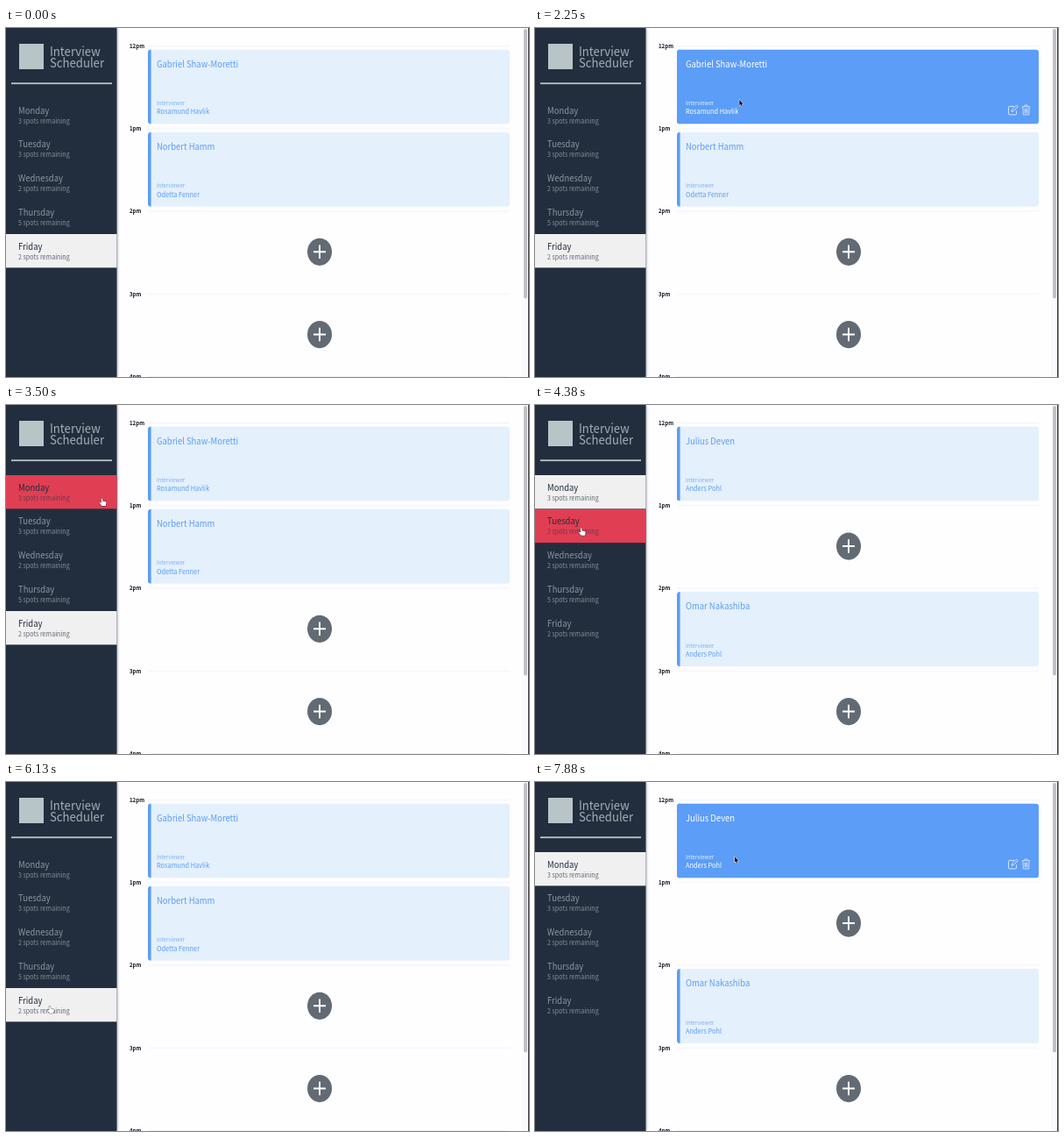
These frames come from a looping animation (597 px wide and 398 px high, 8 s). An HTML page with a canvas:

```html
<!DOCTYPE html>
<html lang="en">
<head>
<meta charset="utf-8">
<title>Interview Scheduler</title>
<style>
  html, body { margin: 0; width: 100%; height: 100%; overflow: hidden; background: #fefdff; }
  canvas { display: block; width: 597px; height: 398px; }
</style>
</head>
<body>
<canvas id="stage"></canvas>
<script>
const WIDTH = 597, HEIGHT = 398, LOOP = 8000, STEP = 125;
const ASPECT = 0.9; // the whole page is squeezed horizontally
const FONT = '"Noto Sans CJK JP", "Noto Sans CJK SC", "Noto Sans CJK", "Noto Sans", sans-serif';
const NAVY = '#222e3e', BLUE = '#5b9df7', PALE = '#e4f0fc', RED = '#e03e53';
const ROW_TOP = 80, ROW_HEIGHT = 38.75, SIDEBAR = 126.5;
const CARD_X = 162, CARD_WIDTH = 413, CARD_TOP = 24.4, CARD_HEIGHT = 85.2, CARD_PITCH = 94.25;

const ROSA = 'Rosamund Havlik', ODETTA = 'Odetta Fenner', ANDERS = 'Anders Pohl';
// bookings: slot -> [visitor, interviewer]
const days = [
  { name: 'Monday', spots: 3, bookings: { 0: ['Julius Deven', ANDERS], 2: ['Omar Nakashiba', ANDERS] } },
  { name: 'Tuesday', spots: 3, bookings: { 0: ['Rafiq Dorsey', ODETTA], 3: ['Bertram Colvins', ANDERS] } },
  { name: 'Wednesday', spots: 2, bookings: {
    0: ['Hugo Bellandi', ODETTA], 2: ['Clara Becker-Hayes', ODETTA], 3: ['Elena Lacombe', ROSA] } },
  { name: 'Thursday', spots: 5, bookings: {} },
  { name: 'Friday', spots: 2, bookings: { 0: ['Gabriel Shaw-Moretti', ROSA], 1: ['Norbert Hamm', ODETTA] } }
];

// [time, day index]
const clicks = [[0, 4], [3875, 0], [4500, 1], [5125, 2], [5625, 3], [6125, 4], [7500, 0]];
// [time, x, y]
const cursorPath = [
  [1000, 150, 296], [1375, 182, 156], [1750, 200, 140], [2125, 225, 80], [2500, 250, 85],
  [2875, 265, 124], [3125, 255, 125], [3625, 60, 100], [3875, 48, 100], [4375, 52, 140],
  [4500, 52, 140], [4875, 50, 180], [5125, 50, 180], [5375, 50, 218], [5500, 49, 221],
  [5625, 50, 221], [5875, 50, 255], [6500, 48, 255], [6750, 44, 140], [7000, 45, 100],
  [7500, 50, 98], [7875, 228, 85]
];
// [time, page offset]
const bounce = [[0, 0], [2625, 0], [2750, 5], [2875, 3], [3000, 1], [3125, 0]];

const canvas = document.getElementById('stage');
const ctx = canvas.getContext('2d');
const ratio = window.devicePixelRatio || 1;
canvas.width = WIDTH * ratio;
canvas.height = HEIGHT * ratio;

function latest(list, time) {
  return list.filter(item => item[0] <= time).pop();
}

function cursorAt(time) {
  const from = latest(cursorPath, time);
  if (!from) return null;
  const to = cursorPath[cursorPath.indexOf(from) + 1] || from;
  const part = (time - from[0]) / (to[0] - from[0] || 1);
  return { x: from[1] + (to[1] - from[1]) * part, y: from[2] + (to[2] - from[2]) * part };
}

function rect(x, y, w, h, color) {
  ctx.fillStyle = color;
  ctx.fillRect(x, y, w, h);
}

function text(value, x, y, size, color, weight = 400) {
  ctx.save();
  ctx.translate(x, y);
  ctx.scale(ASPECT, 1);
  ctx.font = `${weight} ${size}px ${FONT}`;
  ctx.fillStyle = color;
  ctx.fillText(value, 0, 0);
  ctx.restore();
}

function stroke(path, x, y, color, width) {
  ctx.save();
  ctx.translate(x, y);
  ctx.strokeStyle = color;
  ctx.lineWidth = width;
  ctx.stroke(new Path2D(path));
  ctx.restore();
}

function drawSidebar(selected, hovered) {
  ctx.save();
  ctx.shadowColor = 'rgba(30, 40, 60, .45)';
  ctx.shadowBlur = 3 * ratio;
  rect(0, 0, SIDEBAR, HEIGHT, NAVY);
  ctx.restore();

  rect(15, 18, 28, 29, '#b9c4c8');
  text('Interview', 50, 31.5, 14.6, '#a5adb5', 300);
  text('Scheduler', 50, 45, 14.6, '#a5adb5', 300);
  rect(6, 62.3, 115, 1.8, '#bcc2c8');

  days.forEach(({ name, spots }, i) => {
    const y = ROW_TOP + i * ROW_HEIGHT;
    const active = i === selected, hover = i === hovered;
    if (active || hover) rect(0, y, SIDEBAR, ROW_HEIGHT - 0.4, active ? '#f1f0f1' : RED);
    text(name, 14, y + 17.5, 10.5, active || hover ? NAVY : '#8d959e');
    text(`${spots} spots remaining`, 14, y + 28.5, 7.9, active ? '#636a73' : hover ? '#74384a' : '#848c95');
  });
}

function drawPlus(y) {
  ctx.fillStyle = '#626a73';
  ctx.beginPath();
  ctx.ellipse(358, y, 14, 15.6, 0, 0, Math.PI * 2);
  ctx.fill();
  stroke('M-7 0H7M0-7.8V7.8', 358, y, '#fff', 2);
}

function drawCard([visitor, interviewer], y, hover) {
  const ink = hover ? '#fff' : BLUE;
  ctx.save();
  ctx.beginPath();
  ctx.roundRect(CARD_X, y, CARD_WIDTH, CARD_HEIGHT, 3.5);
  ctx.clip();
  rect(CARD_X, y, CARD_WIDTH, CARD_HEIGHT, hover ? BLUE : PALE);
  rect(CARD_X, y, 3.6, CARD_HEIGHT, BLUE);
  ctx.restore();

  text(visitor, 172, y + 20.4, 10.5, ink);
  text('Interviewer', 172, y + 63.8, 6.7, hover ? '#e4f0fc' : '#7db0f5', 300);
  text(interviewer, 172, y + 74, 8.2, ink);
  if (hover) {
    stroke('M7 2H1.5Q.5 2 .5 3V10.5Q.5 11.5 1.5 11.5H8.5Q9.5 11.5 9.5 10.5V7M4 8L4.5 5.8L9.6.6L11.3 2.3L6.2 7.4Z',
      540, y + 63, '#dceaff', 0.95);
    stroke('M.3 2.3H9.7M3.3 2V.6H6.7V2M1.3 2.5L1.8 11.5H8.2L8.7 2.5M3.5 4.3V9.8M5 4.3V9.8M6.5 4.3V9.8',
      555.5, y + 63, '#dceaff', 0.85);
  }
}

function drawSchedule(bookings, hovered) {
  ['12pm', '1pm', '2pm', '3pm', '4pm'].forEach((label, slot) => {
    const y = CARD_TOP + slot * CARD_PITCH;
    text(label, 141, y - 1.6, 6.8, '#151a22', 700);
    rect(CARD_X, y - 4.4, CARD_WIDTH, 1, '#f3f3f5');
    if (bookings[slot]) drawCard(bookings[slot], y, slot === hovered);
    else drawPlus(y + 42.4);
  });
}

function drawCursor({ x, y }, hand) {
  const shape = new Path2D(hand
    ? 'M0 .8Q.8-.5 1.5 .8V3.2L5 4Q6 4.4 5.6 6L5 8.8H.8L-2 5.4Q-1.6 4.2 0 5.4Z'
    : 'M0 0V6.6L1.4 5.4L2.4 7.8L3.5 7.3L2.5 5H4.3Z');
  ctx.save();
  ctx.translate(x, y);
  ctx.lineWidth = hand ? 0.7 : 1;
  ctx.strokeStyle = hand ? '#222' : '#fff';
  ctx.fillStyle = hand ? '#fff' : '#111';
  ctx.stroke(shape);
  ctx.fill(shape);
  ctx.restore();
}

function draw(now) {
  const time = Math.floor((now % LOOP) / STEP) * STEP;
  const selected = latest(clicks, time)[1];
  const offset = latest(bounce, time)[1];
  const cursor = cursorAt(time);
  let row = -1, card = -1;
  if (cursor) {
    const y = cursor.y - offset;
    if (cursor.x < SIDEBAR) {
      row = Math.floor((y - ROW_TOP) / ROW_HEIGHT);
    } else if (cursor.x > CARD_X) {
      const slot = Math.floor((y - CARD_TOP) / CARD_PITCH);
      if (y - CARD_TOP - slot * CARD_PITCH < CARD_HEIGHT) card = slot;
    }
  }

  ctx.setTransform(ratio, 0, 0, ratio, 0, 0);
  rect(0, 0, WIDTH, HEIGHT, '#fefdff');
  ctx.save();
  ctx.translate(0, offset);
  drawSchedule(days[selected].bookings, card);
  drawSidebar(selected, row);
  ctx.restore();

  rect(589, 0, 7, HEIGHT, '#fafafb');
  ctx.fillStyle = '#c1c1c3';
  ctx.beginPath();
  ctx.roundRect(591, 1, 4, 307.5, 2);
  ctx.fill();
  rect(596, 0, 1, HEIGHT, '#3a3a3c');
  if (cursor) drawCursor(cursor, row >= 0 && row < days.length);
}

const start = performance.now();
function tick() {
  draw(performance.now() - start);
  requestAnimationFrame(tick);
}
tick();
</script>
</body>
</html>
```
